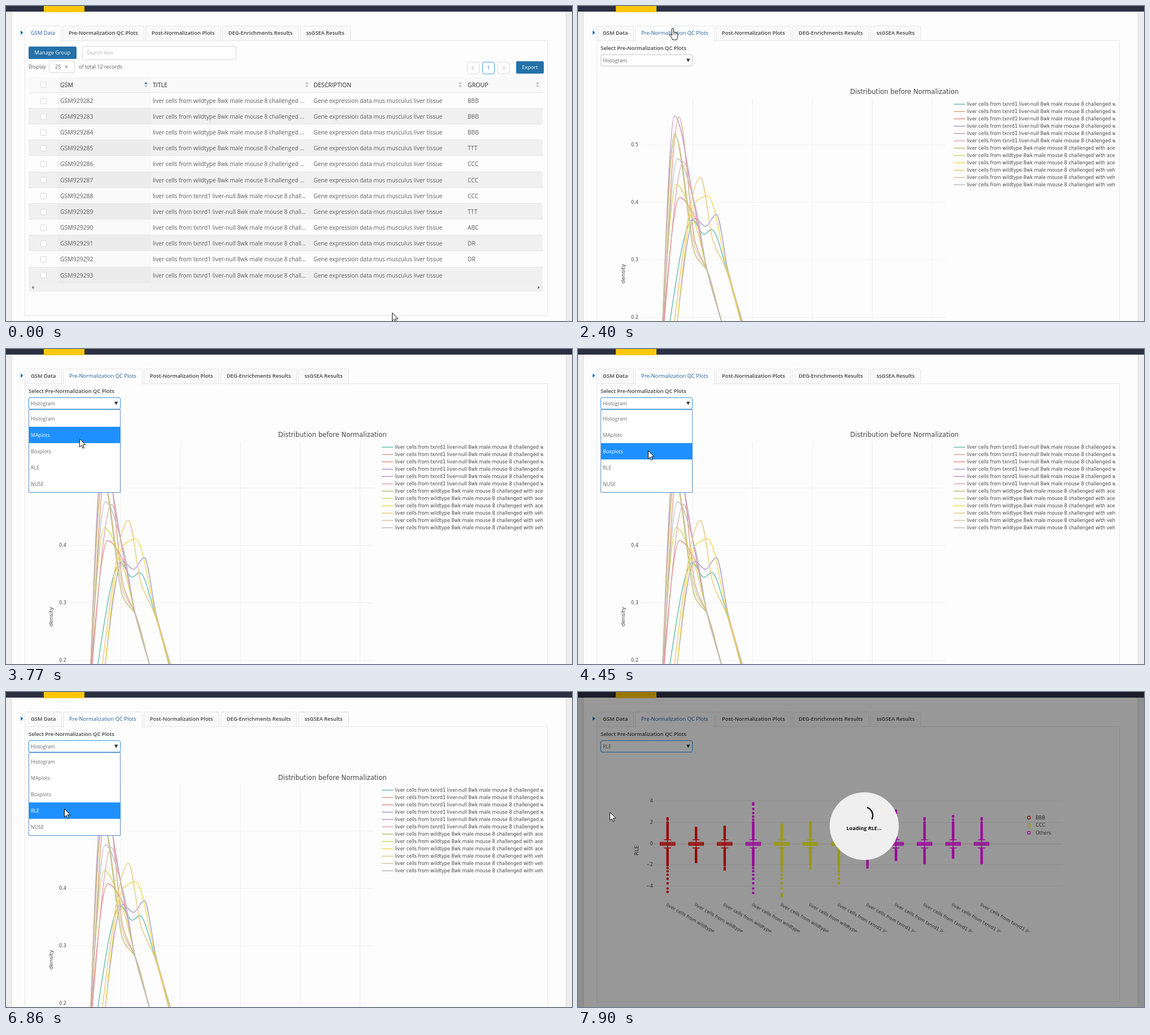
An HTML page with a canvas for the animation above (8000 ms loop, 1003 by 559 pixels).

```html
<!DOCTYPE html>
<html lang="en">
<head>
<meta charset="utf-8">
<title>QC plots</title>
<style>
html, body { margin: 0; width: 100%; height: 100%; overflow: hidden; background: #fdfdfd; }
canvas { display: block; }
</style>
</head>
<body>
<canvas id="stage" width="1003" height="559"></canvas>
<script>
const g = document.getElementById('stage').getContext('2d');
const LOOP = 8000, HOVER_TAB = 690, OPEN_TAB = 2400, HOVER_SELECT = 2750, OPEN_LIST = 3430, PICKED = 7540, LOADING = 7900;
const UI = '"Open Sans", "Noto Sans", sans-serif';
const PLOT = '"DejaVu Sans", sans-serif';
const BLUE = '#2471a8', LINE = '#e6e6e6', GRAY = '#5c5c5c', INK = '#404040';

// The pointer jumps: time, x, y
const STOPS = [
  [0, 684, 544], [330, 190, 151], [HOVER_TAB, 147, 46], [1040, 161, 39], [HOVER_SELECT, 125, 102], [3100, 125, 95],
  [3770, 130, 159], [4120, 124, 180], [4820, 117, 207], [6510, 103, 207], [7190, 74, 206], [PICKED, 56, 213]
];
const CLICKS = [3100, 5140, PICKED], CLICK_TIME = 345;
const ARROW = new Path2D('M.5 .5V15L3.9 11.8 6.2 17.2 8.4 16.3 6.1 11H10.8Z');
const HAND = new Path2D('M5.3 13.5V2C5.3 .2 8.5 .2 8.5 2V7.5C9.5 6.6 11 7 11.2 8.2 12.2 7.4 13.5 8 13.7 9.3' +
  ' 15 8.8 15.8 9.6 15.8 11V14.5C15.8 17 14 18.5 14 21H6.5C6.5 19 3.5 16 1.2 13 .5 11.3 2.2 10.4 3.5 11.7Z');

function rect(x, y, w, h, fill, stroke, r = 0, lw = 1) {
  g.beginPath();
  g.roundRect(stroke ? x + .5 : x, stroke ? y + .5 : y, w, h, r);
  if (fill) { g.fillStyle = fill; g.fill(); }
  if (stroke) { g.strokeStyle = stroke; g.lineWidth = lw; g.stroke(); }
}
function line(x1, y1, x2, y2, color, lw = 1) {
  g.beginPath(); g.moveTo(x1, y1); g.lineTo(x2, y2);
  g.strokeStyle = color; g.lineWidth = lw; g.stroke();
}
// Triangle with its base centred on x,y and its tip at dx,dy
function triangle(x, y, dx, dy, half, color) {
  const n = half / Math.hypot(dx, dy);
  g.beginPath();
  g.moveTo(x - dy * n, y + dx * n); g.lineTo(x + dx, y + dy); g.lineTo(x + dy * n, y - dx * n);
  g.fillStyle = color; g.fill();
}
function chevron(x, y, dx, dy, color) {
  g.beginPath();
  g.moveTo(x - dx - dy, y - dy - dx); g.lineTo(x + dx, y + dy); g.lineTo(x - dx + dy, y - dy + dx);
  g.strokeStyle = color; g.lineWidth = 1; g.stroke();
}
function dot(x, y, r, color) {
  g.beginPath(); g.arc(x, y, r, 0, 7); g.fillStyle = color; g.fill();
}
// y is the middle of the capitals
function text(s, x, y, size, color = GRAY, weight = 400, font = UI, align = 'left') {
  g.font = `${weight} ${size}px ${font}`;
  g.textAlign = align; g.fillStyle = color;
  g.fillText(s, x, y + size * .36);
}
const plotText = (s, x, y, size = 8.2, align = 'left') => text(s, x, y, size, '#444', 400, PLOT, align);
function rotated(s, x, y, angle, size, align) {
  g.save(); g.translate(x, y); g.rotate(angle);
  plotText(s, 0, 0, size, align);
  g.restore();
}
function clipped(x, y, w, h, draw) {
  g.save(); g.beginPath(); g.rect(x, y, w, h); g.clip();
  draw(); g.restore();
}

function page(closed) {
  rect(0, 0, 1003, 559, '#ededed');
  rect(9, 9, 983, 560, '#fdfdfd', '#d6d6d6');
  rect(0, 0, 1003, 10, '#2c3043');
  rect(67, 0, 72, 11, '#ffc60b');
  rect(33, 61, 926, closed ? 488 : 560, null, LINE);
  triangle(26, 47.3, 4.5, 0, 3.8, BLUE);
}

const TABS = ['GSM Data', 'Pre-Normalization QC Plots', 'Post-Normalization Plots', 'DEG-Enrichments Results', 'ssGSEA Results'];
function tabs(active, hover) {
  let x = 33;
  TABS.forEach((name, i) => {
    const on = i === active, size = 9.35, weight = on ? 400 : 600;
    g.font = `${weight} ${size}px ${UI}`;
    const w = Math.round(g.measureText(name).width) + 22;
    rect(x, 35, w - 1, on ? 28 : 26, on ? '#fdfdfd' : '#f9f9f9', LINE, [3, 3, 0, 0]);
    if (on) rect(x + 1, 61, w - 2, 4, '#fdfdfd');
    text(name, x + 11, 48, size, on || i === hover ? '#1f5f9e' : INK, weight);
    x += w + 2;
  });
}

function button(label, x, y, w) {
  rect(x, y, w, 22, BLUE, null, 2.5);
  text(label, x + w / 2, y + 11, 9.2, '#fff', 400, UI, 'center');
}
const field = (x, y, w, h, edge = '#d6d6d6') => rect(x, y, w, h, '#fff', edge, 3);
const checkbox = y => rect(61, Math.round(y - 5.5), 10, 10, '#fff', '#d9d9d9', 1.5);
function sorter(x, on) {
  triangle(x, 138.5, 0, -3.7, 3, on ? BLUE : '#bbb');
  triangle(x, 141, 0, 3.5, 3, '#bbb');
}

function toolbar() {
  button('Manage Group', 40, 72, 85);
  button('Export', 904, 98, 49);
  field(135, 71, 272, 24);
  text('Search text', 143, 83, 9, '#b5b5b5');
  text('Display', 40, 107.5, 9.15);
  field(76, 97, 45, 21);
  text('25', 87, 107.5, 9.3);
  chevron(107, 108, 0, 2, '#666');
  text('of total 12 records', 129, 107.5, 9.05);
  for (let i = 0; i < 3; i++) field(817 + 27 * i, 99, 21, 21, i === 1 ? '#4a9bd4' : '#d9d9d9');
  chevron(827.5, 110, -2.5, 0, '#bbb');
  text('1', 855, 110, 9.3, '#1f78c0', 400, UI, 'center');
  chevron(882, 110, 2.5, 0, '#bbb');
}

const COLUMNS = [['GSM', 96, 248], ['TITLE', 260, 533], ['DESCRIPTION', 545, 805], ['GROUP', 818, 942]];
const GROUPS = 'BBB BBB BBB TTT CCC CCC CCC TTT ABC DR DR'.split(' ');
function tableRow(i) {
  const top = 154 + Math.round(28.15 * i), y = 168 + 28.17 * i, odd = i % 2;
  rect(40, top, 911, 28, odd ? '#f0f0f0' : '#fdfdfd');
  rect(92, top, 165, 28, odd ? '#ececec' : '#fafafa');
  line(40, top + 27.5, 951, top + 27.5, LINE);
  checkbox(y);
  const title = i < 6 ? 'wildtype 8wk male mouse 8 challenged ...' : 'txnrd1 liver-null 8wk male mouse 8 chall...';
  const cells = ['GSM' + (929282 + i), 'liver cells from ' + title, 'Gene expression data mus musculus liver tissue', GROUPS[i] || ''];
  cells.forEach((s, c) => text(s, COLUMNS[c][1], y, c ? 10.22 : 10.45));
}
function tablePage(hover) {
  page(true);
  tabs(0, hover ? 1 : -1);
  toolbar();
  rect(40, 126, 911, 27, '#f9f9f9');
  rect(92, 126, 165, 27, '#f6f6f6');
  line(40, 153.5, 951, 153.5, LINE);
  checkbox(139.7);
  COLUMNS.forEach(([name, x, sortX], i) => {
    text(name, x, 139.7, 10.6, '#262626');
    sorter(sortX, i === 0);
  });
  for (let i = 0; i < 12; i++) tableRow(i);
  rect(40, 491.5, 911, 15.5, '#f1f1f1');
  triangle(49, 499.5, -3.5, 0, 3, '#777');
  triangle(942.5, 499.5, 3.5, 0, 3, '#777');
}

// A density climbs from its foot over its humps and falls to its end
const density = (color, foot, end, ...humps) =>
  ({ color, knots: [foot, 559, ...humps, end - 25, 470, end, 559] });
// Most peak early and share a shoulder
const early = (color, x, y, shoulder) => density(color, 150 + (x - 171) / 5, 254, x, y, 208, shoulder);
const CURVES = [
  density('#66bdb0', 163, 289, 203, 379, 223, 405, 237, 397),
  early('#dca27e', 179, 197, 420),
  early('#e38f7e', 180, 340, 376),
  density('#a79cc8', 176, 291, 207, 377, 226, 391, 245, 370),
  early('#c096c8', 171, 195, 362),
  early('#e2a3b0', 187, 276, 365),
  early('#b8bc6c', 171, 227, 442),
  early('#d2d65a', 174, 317, 388),
  density('#f3d850', 176, 290, 207, 349, 230, 337),
  density('#ecc87a', 171, 288, 217, 304, 239, 415),
  early('#d5c49c', 172, 229, 430),
  early('#bcbabf', 176, 271, 355)
];
// Monotone cubic through the knots
function curve({ color, knots }) {
  const n = knots.length / 2, X = i => knots[2 * i], Y = i => knots[2 * i + 1];
  const secant = i => (Y(i + 1) - Y(i)) / (X(i + 1) - X(i));
  const slope = i => {
    if (i === 0) return 1.5 * secant(0);
    if (i === n - 1) return secant(n - 2);
    const a = secant(i - 1), b = secant(i);
    return a * b <= 0 ? 0 : 2 * a * b / (a + b);
  };
  g.beginPath(); g.moveTo(X(0), Y(0));
  for (let i = 0; i < n - 1; i++) {
    const d = (X(i + 1) - X(i)) / 3;
    g.bezierCurveTo(X(i) + d, Y(i) + d * slope(i), X(i + 1) - d, Y(i + 1) - d * slope(i + 1), X(i + 1), Y(i + 1));
  }
  g.strokeStyle = color; g.lineWidth = 1.4; g.stroke();
}
function histogram() {
  for (let i = 0; i < 5; i++) {
    const x = 203.5 + Math.round(106.1 * i);
    line(x, 164, x, 559, '#f0f0f0');
  }
  for (let i = 0; i < 4; i++) {
    const y = 246 + 102 * i;
    line(111, y + .5, 651, y + .5, '#f0f0f0');
    plotText((.5 - i / 10).toFixed(1), 107, y, 8.2, 'right');
  }
  plotText('Distribution before Normalization', 578.5, 151.5, 11.57, 'center');
  rotated('density', 79.5, 475, -Math.PI / 2, 9.5, 'center');
  CURVES.forEach(curve);
  clipped(660, 160, 292, 170, () => CURVES.forEach(({ color }, i) => {
    const y = 174 + 13 * i;
    line(666, y + .3, 686, y + .3, color, 1.5);
    plotText('liver cells from ' + (i < 6 ? 'txnrd1 liver-null' : 'wildtype') + ' 8wk male mouse 8 challenged with ' +
      (i % 6 < 3 ? 'acetaminophen' : 'vehicle'), 689, y);
  }));
}

const ZERO = 269.5, UNIT = 18.95;
const BOX_COLOR = { B: '#f00', C: '#ff0', O: '#f0f' };
const BOXES = 'BBBOCCCOOOOO';
// Farthest values above and below zero
const HIGHS = [2.4, 1.5, 1.6, 3.8, 1.8, 2, 1.5, 1.7, 3.1, 2.4, 2.6, 2.4];
const LOWS = [4.5, 1.7, 2.4, 4.6, 4.9, 2.3, 3.7, 2.2, 1.5, 1.8, 1.3, 1.8];
// Dots are dense near the box and thin out with distance
function whisker(x, reach, dir, color) {
  for (let d = 8; d < reach; d += d < 38 ? 2 : d * .13) dot(x, ZERO + dir * d, 2.2, color);
  dot(x, ZERO + dir * reach, 2.2, color);
  line(x - 6.5, ZERO + dir * 7.2, x + 6.5, ZERO + dir * 7.2, color, 1.3);
}
function boxplots() {
  for (let v = 4; v >= -4; v -= 2) {
    const y = Math.round(ZERO - UNIT * v) - .5;
    line(134, y, 858, y, v ? '#eee' : '#ddd');
    plotText(String(v).replace('-', '\u2212'), 133, y, 8.2, 'right');
  }
  rotated('RLE', 104, 281, -Math.PI / 2, 9.5, 'center');
  [...BOXES].forEach((key, i) => {
    const x = 158.7 + 50.6 * i, color = BOX_COLOR[key];
    whisker(x, HIGHS[i] * UNIT, -1, color);
    whisker(x, LOWS[i] * UNIT, 1, color);
    line(x, 261, x, 277, color, 1.3);
    g.globalAlpha = .5; rect(x - 13, 267, 26, 5, color); g.globalAlpha = 1;
    g.strokeStyle = color; g.lineWidth = 1.4; g.strokeRect(x - 13, 267, 26, 5);
    line(x - 13, ZERO, x + 13, ZERO, color, 1.3);
    clipped(40, 360, 900, 66, () =>
      rotated('liver cells from ' + (i < 6 ? 'wildtype' : 'txnrd1 liver'), x - 1.7, 376.5, Math.PI / 6));
  });
  ['BBB', 'CCC', 'Others'].forEach((name, i) => {
    const y = 223 + 13.4 * i;
    g.beginPath(); g.arc(799, y, 2.6, 0, 7);
    g.strokeStyle = BOX_COLOR[name[0]]; g.lineWidth = 1.2; g.stroke();
    plotText(name, 811, y);
  });
}

const OPTIONS = ['Histogram', 'MAplots', 'Boxplots', 'RLE', 'NUSE'];
const ROW = 29.1;
function select(value, hover, focus) {
  text('Select Pre-Normalization QC Plots', 40, 74.5, 9.35, INK, 600);
  if (focus) rect(40, 86, 162, 20, null, 'rgba(70,150,235,.35)', 3, 2.6);
  rect(40, 86, 162, 20, '#fff', hover ? '#5ba6e6' : '#c8c8c8', 2.5);
  text(value, 44, 96.5, 8.85, '#666');
  triangle(195.2, 93.5, 0, 6, 3.2, '#333');
}
function dropdown(pointerY) {
  const current = Math.max(0, Math.floor((pointerY - 109) / ROW));
  rect(40, 107, 162, 147, '#fff', '#5b8fc7');
  OPTIONS.forEach((name, i) => {
    const on = i === current, y = 123.5 + ROW * i;
    if (on) rect(41, Math.round(y - 14.5), 161.5, 29, '#1e90ff');
    text(name, 44, y, 8.85, on ? '#fff' : '#6a6a6a');
  });
}
function loader() {
  rect(0, 0, 1003, 559, 'rgba(0,0,0,.4)');
  g.beginPath(); g.ellipse(507.2, 238, 61.2, 60, 0, 0, 7);
  g.fillStyle = '#efefef'; g.fill();
  g.beginPath(); g.arc(507.5, 219, 14.8, -1.25, .48);
  g.strokeStyle = '#111'; g.lineWidth = 2.4; g.stroke();
  text('Loading RLE...', 506.8, 242, 9.1, '#111', 700, UI, 'center');
}

function plotPage(t, pointerY) {
  const loading = t >= LOADING;
  page(loading);
  tabs(1);
  if (loading) boxplots(); else histogram();
  select(loading ? 'RLE' : 'Histogram', t >= HOVER_SELECT, t >= OPEN_LIST);
  if (t >= OPEN_LIST && t < PICKED) dropdown(pointerY);
  if (loading) loader();
}
function pointer(t, x, y) {
  const hand = t >= HOVER_TAB && t < HOVER_SELECT, shape = hand ? HAND : ARROW;
  if (CLICKS.some(c => t >= c && t < c + CLICK_TIME)) dot(x - .5, y, 11, 'rgba(255,255,0,.6)');
  g.save(); g.translate(x, y);
  g.fillStyle = '#fff'; g.fill(shape);
  g.strokeStyle = '#111'; g.lineWidth = 1; g.lineJoin = 'round'; g.stroke(shape);
  if (hand) for (let k = 8.5; k < 14; k += 2.6) line(k, 8, k, 11.5, '#111', .8);
  g.restore();
}

const start = performance.now();
function frame() {
  const t = (performance.now() - start) % LOOP;
  const [, x, y] = STOPS.findLast(s => s[0] <= t);
  if (t < OPEN_TAB) tablePage(t >= HOVER_TAB); else plotPage(t, y);
  pointer(t, x, y);
  requestAnimationFrame(frame);
}
frame();
</script>
</body>
</html>
```
